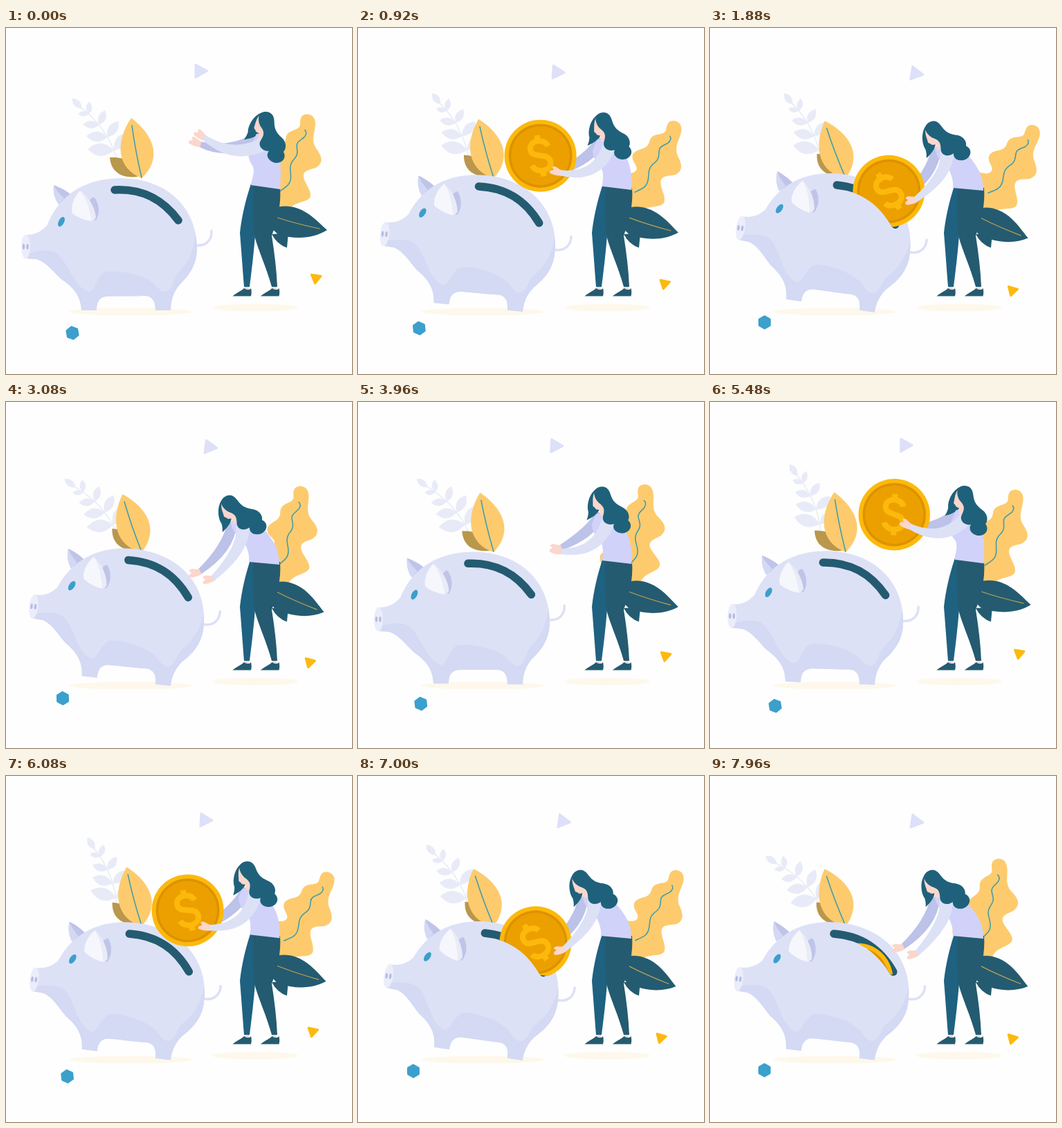
These frames come from a looping animation (500 by 500 pixels, 8000 ms). An HTML page:

```html
<!DOCTYPE html>
<html lang="en">
<head>
<meta charset="utf-8">
<title>Saving in a piggy bank</title>
<style>
html, body { margin: 0; height: 100%; overflow: hidden; background: #fefefe; }
svg { display: block; width: 100vw; height: 100vh; }
.round { stroke-width: 3; stroke-linejoin: round; }
.line { fill: none; stroke-linecap: round; }
</style>
</head>
<body>
<svg viewBox="0 0 500 500">
  <defs>
    <path id="pigShape" d="M28,299C42,299 52,294 60,284C68,264 92,218 165,217C235,217 276,262 276,318C276,345 262,360 250,372C242,382 238,394 238,408L216,408C216,396 212,387 200,387C180,388 160,387 144,388C133,390 131,398 131,408L109,408C108,385 95,373 80,363C68,352 58,338 44,334L28,333Z"/>
    <clipPath id="pigClip"><use href="#pigShape"/></clipPath>
    <clipPath id="aboveSlot"><path id="slotEdge" d="M60,239.5L157,239.5C194,238 222,253 245,282L520,282L520,-60L60,-60Z"/></clipPath>
    <path id="hand" fill="#fbd6cb" d="M2,-4C-4,-5 -7,-10 -12,-8C-14,-6 -9,-4 -11,-3C-15,-3 -17,0 -15,2C-10,4 -3,5 2,4Z"/>
    <path id="shoe" fill="#245b70" d="M327.500,387.500C334,382 340,380 344,376C348,379 352,379 354,376C355,380 355,384 354,387.500Z"/>
  </defs>

  <ellipse cx="180" cy="410" rx="89" ry="5.5" fill="#fdf8eb"/>
  <ellipse cx="360" cy="404" rx="62" ry="5.5" fill="#fdf8eb"/>

  <path id="triangle" class="round" fill="#dde0f8" stroke="#dde0f8" d="M274,53L290.500,62L274,71.500Z"/>
  <path id="hexagon" class="round" fill="#3ba0cc" stroke="#3ba0cc"/>
  <path id="gold" class="round" fill="#fdb90e" stroke="#fdb90e" d="M441.500,356.500L455,358.500L446.500,369Z"/>

  <g id="branch" fill="#e8ebf7"><path class="line" stroke="#e8ebf7" stroke-width="1.500" d="M160,188Q146,140 104,109"/></g>
  <path id="brownLeaf" fill="#b9974c" d="M150,187C175,186 190,195 190,215C172,217 152,212 150,187Z"/>
  <g id="yellowLeaf">
    <path fill="#fdcb6e" d="M181,130C208,150 230,185 196,217C160,203 157,165 181,130Z"/>
    <path class="line" stroke="#3b9aae" stroke-width="1.500" d="M182,141Q187,178 196,216"/>
  </g>

  <g id="plant">
    <path fill="#fdcb6e" d="M437,125C447,126 450,135 447,148C444,160 444,168 450,176C457,186 460,195 449,202C438,206 428,206 431,218C433,226 442,236 440,244C436,254 416,250 408,264L385,265C370,255 352,232 357,216C365,205 385,215 392,206C398,198 380,192 385,181C391,171 404,174 405,160C407,145 425,150 426,140C426,130 428,125 437,125Z"/>
    <path class="line" stroke="#3b9aae" stroke-width="1.500" d="M396,236C406,229 412,226 412,215C412,205 409,200 415,192C423,184 422,180 421,172C420,165 426,163 432,158C436,153 435,150 433,148"/>
  </g>
  <path fill="#245b70" d="M384,298Q392,313 406,317.500L408,296Z"/>
  <g id="darkLeaf">
    <path fill="#245b70" d="M385,262C400,254 420,257 436,268C448,276 456,285 464,292C445,304 420,306 395,299C380,290 378,275 385,262Z"/>
    <path class="line" stroke="#c0a050" stroke-width="1.200" d="M392,274Q420,283 453,290"/>
  </g>

  <g id="pig">
    <path class="line" stroke="#dde1f6" stroke-width="3.500" d="M274,314C289,316 298,306 297,293"/>
    <path fill="#bfc4e8" d="M69,227C80,231 88,236 93,240L76,255C70,246 68,236 69,227Z"/>
    <path fill="#d3d8f4" d="M69,227C68,238 70,246 76,255L84,246C78,240 72,234 69,227Z"/>
    <use href="#pigShape" fill="#dde1f6"/>
    <path clip-path="url(#pigClip)" fill="#d4d9f4" d="M28,326C50,322 65,318 76,328C92,345 98,372 118,381C130,384 130,354 146,352C170,350 200,358 212,368C220,376 226,384 234,380C244,372 240,362 252,350C264,338 272,318 274,297L290,300L290,420L20,420Z"/>
    <ellipse cx="28.500" cy="316" rx="6.500" ry="17.500" fill="#ebedfa"/>
    <ellipse cx="25.500" cy="316" rx="1.700" ry="4" fill="#b4bce6"/>
    <ellipse cx="31" cy="316" rx="1.700" ry="4" fill="#b4bce6"/>
    <ellipse cx="80" cy="280" rx="4" ry="7.500" transform="rotate(27 80 280)" fill="#3b9fcb"/>
    <path fill="#bfc4e8" d="M119,252C122,247 126,243 128,245C135,255 136,268 130,278L124,278Z"/>
    <path fill="#e9ebf6" d="M107,235C118,242 128,257 130,273Q129,278 124,279L112,276Z"/>
    <path fill="#f6f7fc" d="M107,235C97,245 93,260 96,268C104,274 114,278 124,279C121,262 116,246 107,235Z"/>
    <path class="line" stroke="#245b70" stroke-width="11.500" d="M157,234C197,232 226,247 249,278"/>
  </g>

  <path id="backArm" fill="#bcc2e8"/>
  <use id="backHand" href="#hand"/>

  <g clip-path="url(#aboveSlot)"><g id="coin">
    <circle r="52" fill="#fdb90b"/>
    <circle r="46" fill="#dc9200"/>
    <circle r="42.500" fill="#eca000"/>
    <path class="line" style="stroke-linecap:butt" stroke="#fdb90b" stroke-width="8" d="M13,-12C10,-25 -13,-25 -13,-11C-13,3 13,-4 13,11C13,25 -11,25 -14,12M0,-20V-30M0,20V30"/>
  </g></g>

  <path fill="#fbd6cb" d="M345,371h6v9h-6zM385,371h6v9h-6z"/>
  <path fill="#1f6180" d="M354,225C346,250 341,270 338,296C340,320 342,350 344,374L352,374C355,350 358,325 360,300C362,280 372,250 375,228Z"/>
  <path fill="#245b70" d="M358,226L396,231C398,255 392,280 384,300C388,325 391,350 392,374L384,374C376,345 364,320 359,300C357,280 357,250 358,226Z"/>
  <use href="#shoe"/><use href="#shoe" x="40.500"/>

  <path id="backHair" fill="#1f617b" d="M376,121C360,122 350,140 350,150C348,156 346,158 344,161C352,160 362,158 368,150Z"/>
  <path id="torso" fill="#d1d2fa"/>
  <path id="face" fill="#fbd6cb" d="M367,125C361,133 361,138 359,143C358,146 361,146 361,149C363,152 366,151 366,154L364,160C368,163 374,160 376,156L376,130Z"/>
  <use id="frontHand" href="#hand"/>
  <path id="frontArm" fill="#dde1f6"/>
  <path id="hair" fill="#1f617b" d="M366,126C369,119 388,117 388,135C388,148 392,152 400,160C407,168 404,177 401,179C407,190 396,198 386,194C377,190 376,182 380,178C370,178 364,170 368,163C374,154 374,150 368,142C365,136 365,131 366,126Z"/>
</svg>
<script>
const LOOP = 8000, CYCLE = 5000;
const $ = id => document.getElementById(id);
const put = (id, value, name = 'transform') => $(id).setAttribute(name, value);
const degrees = radians => radians * 180 / Math.PI;

// Eased step from 0 to 1 between two times.
function ramp(t, from, to) {
  const u = Math.min(1, Math.max(0, (t - from) / (to - from)));
  return u * u * (3 - 2 * u);
}

// Eased swing through turning points [time, angle].
const swing = (t, turns) => turns.slice(1).reduce(
  (angle, [time, next], i) => angle + (next - turns[i][1]) * ramp(t, turns[i][0], time), turns[0][1]);

const PLANT = [[-1500, -11], [1860, 14], [3600, -10], [4600, -9], [6500, 16], [8300, -11]];
const BRANCH = [[-1200, -8], [1500, 8], [3500, -11], [5900, 13], [8200, -13]];

// Shoulder, elbow and wrist while reaching, holding and leaning over the slot.
const FRONT_ARM = [[[374, 167], [328, 190], [286, 157]], [[363, 168], [348, 220], [293, 213]], [[342, 178], [346, 211], [297, 248]]];
const BACK_ARM = [[[366, 157], [322, 184], [279, 167]], [[351, 161], [336, 190], [292, 211]], [[327, 174], [322, 212], [279, 246]]];
const TORSO = [
  'M362,153C372,150 390,168 395,185C398,200 397,215 396,233L354,227C356,215 360,208 357,200C352,192 350,188 351,180Z',
  'M325,172C345,163 372,178 383,197C392,210 395,220 395,235L351,231C352,222 350,216 346,206C335,195 325,185 325,172Z'];

function morph([from, to], u) {
  const ends = to.match(/\d+/g);
  let i = 0;
  return from.replace(/\d+/g, n => (+n + (ends[i++] - n) * u).toFixed(2));
}

// Tapered sleeve along shoulder, elbow and wrist, with the hand at its end.
function drawArm(name, poses, bend, shoulderWidth, release = 0) {
  const weights = [(bend - 1) * (bend - 2) / 2, bend * (2 - bend), bend * (bend - 1) / 2];
  const joints = poses[0].map((joint, j) =>
    joint.map((_, axis) => poses.reduce((sum, pose, k) => sum + pose[j][axis] * weights[k], 0)));
  const [shoulder, elbow, wrist] = joints;
  wrist[0] += 2 * release;
  wrist[1] += 7 * release;
  const direction = (a, b) => Math.atan2(b[1] - a[1], b[0] - a[0]);
  const side = ([x, y], angle, width) =>
    `${(x + width * Math.sin(angle)).toFixed(2)},${(y - width * Math.cos(angle)).toFixed(2)}`;
  const upper = direction(shoulder, elbow), lower = direction(elbow, wrist), whole = direction(shoulder, wrist);
  put(name + 'Arm', `M${side(shoulder, upper, shoulderWidth)}Q${side(elbow, whole, 10)} ${side(wrist, lower, 4)}`
    + `L${side(wrist, lower, -4)}Q${side(elbow, whole, -10)} ${side(shoulder, upper, -shoulderWidth)}Z`, 'd');
  const tilt = degrees(Math.atan2(elbow[1] - wrist[1], elbow[0] - wrist[0]));
  put(name + 'Hand', `translate(${wrist}) rotate(${tilt * 0.6})`);
}

function addLeaf(x, y, length, angle) {
  const leaf = document.createElementNS('http://www.w3.org/2000/svg', 'path');
  const mid = length * 0.5, width = length * 0.48;
  leaf.setAttribute('d', `M0,0Q${mid},${-width} ${length},0Q${mid},${width} 0,0Z`);
  leaf.setAttribute('transform', `translate(${x},${y}) rotate(${angle})`);
  $('branch').append(leaf);
}

for (let i = 0; i < 4; i++) {
  const u = 0.12 + 0.22 * i, v = 1 - u;
  const x = 160 * v * v + 292 * u * v + 104 * u * u;
  const y = 188 * v * v + 280 * u * v + 109 * u * u;
  addLeaf(x, y, 38 - 7.5 * i, 184);
  addLeaf(x, y, 33 - 5 * i, -50 - 4 * i * i);
}
addLeaf(111, 115, 20, -133);

put('hexagon', 'M' + Array.from({ length: 6 }, (_, i) => {
  const a = (i * 60 - 90) * Math.PI / 180;
  return [8.6 * Math.cos(a), 8.6 * Math.sin(a)].map(n => n.toFixed(2));
}).join('L') + 'Z', 'd');

function draw(t) {
  const c = t % CYCLE;
  const bend = 2.06 * (ramp(c, -120, 2120) - ramp(c, 2850, 5030));
  const release = ramp(c, 1850, 2350) - ramp(c, 3080, 4700);
  const tilt = 8.5 * (ramp(c, 0, 1500) - ramp(c, 2520, 4250));
  const sink = ramp(c, 1850, 3200);
  const drift = ramp(t, 0, 2000) - ramp(t, 2400, 4850) + ramp(t, 5000, 7400);

  put('torso', morph(TORSO, bend / 2), 'd');
  drawArm('front', FRONT_ARM, bend, 10, release);
  drawArm('back', BACK_ARM, bend, 7);
  const head = `translate(${376 - 24 * bend - 3 * bend ** 2},${121 + 2 * bend ** 3}) rotate(${-17.5 * bend}) translate(-376,-121)`;
  ['backHair', 'face', 'hair'].forEach(id => put(id, head));

  const pig = `rotate(${tilt} 217 408)`;
  put('pig', pig);
  put('slotEdge', pig);
  put('brownLeaf', `rotate(${tilt} 188 215)`);

  put('coin', `translate(${268 - 4.75 * bend - 50 * sink},${150 + 33 * bend + 5 * bend ** 2 + 60 * sink})`
    + ` rotate(${10 - 21 * bend}) scale(${ramp(c, 80, 500)})`);
  $('coin').style.display = c > 3060 ? 'none' : '';

  put('triangle', `translate(${17.5 * drift},${3.5 * drift}) rotate(${9 * drift} 279 62)`);
  put('hexagon', `translate(${96 - 17.3 * drift},${440.7 - 15.5 * drift}) rotate(${-10 + 10 * drift})`);
  put('gold', `translate(${-11 * drift},${18 * drift}) rotate(${8 * drift} 447 362)`);
  put('yellowLeaf', `rotate(${-10.4 * drift} 197 217)`);
  put('darkLeaf', `rotate(${1.5 * bend * (1 + bend)} 388 270)`);
  put('plant', `rotate(${swing(t, PLANT)} 390 262)`);
  put('branch', `rotate(${swing(t, BRANCH)} 160 188)`);
}

const start = performance.now();
function frame() {
  draw((performance.now() - start) % LOOP);
  requestAnimationFrame(frame);
}
frame();
</script>
</body>
</html>
```
